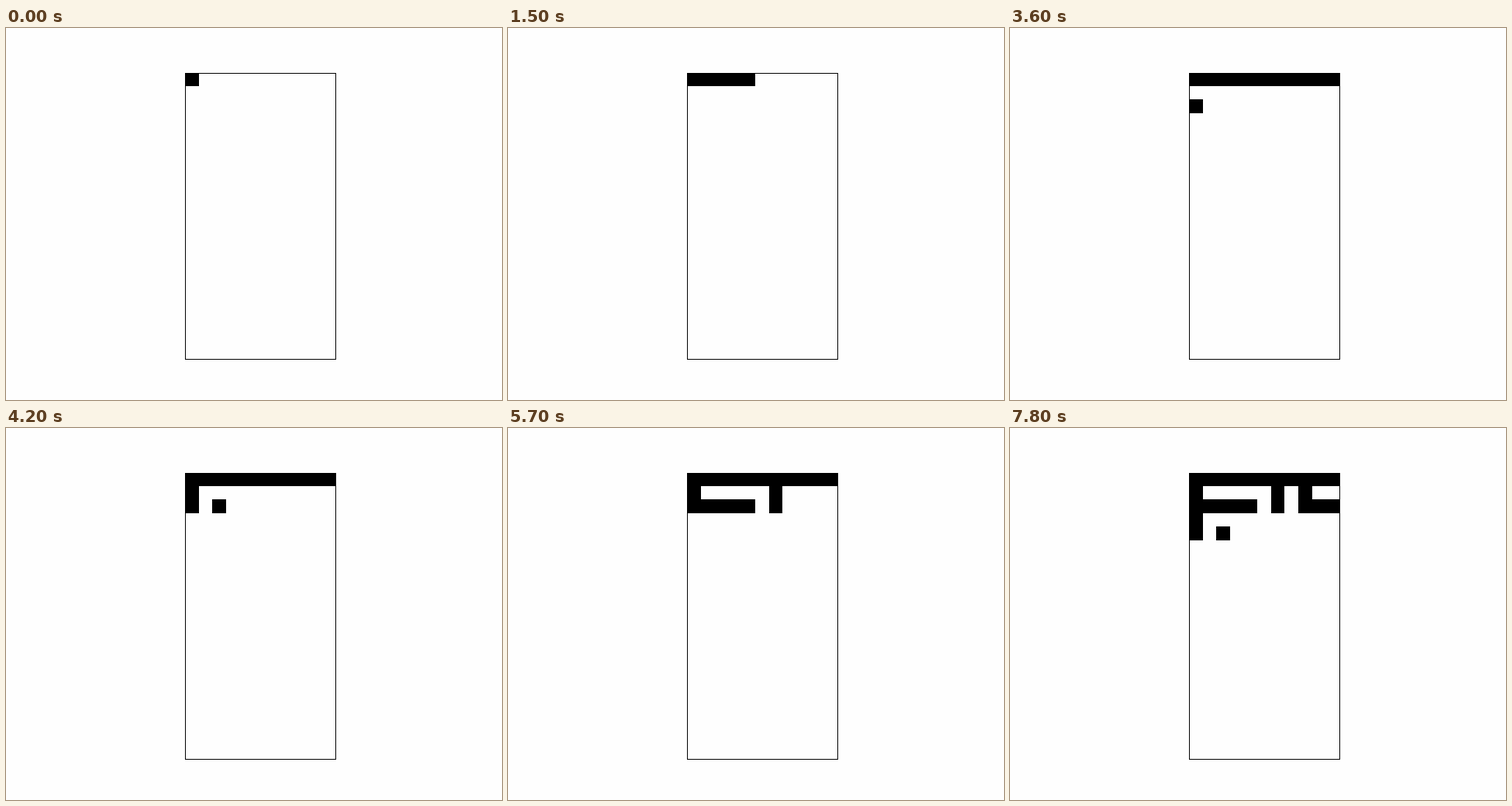
An HTML page with a canvas for the animation above (8000 ms loop, 640 by 480 pixels).

```html
<!DOCTYPE html>
<html lang="en">
<head>
<meta charset="utf-8">
<title>Maze growing</title>
<style>
  html, body { margin: 0; height: 100%; overflow: hidden; background: #fefefe; }
  canvas { display: block; }
</style>
</head>
<body>
<canvas id="stage" width="640" height="480"></canvas>
<script>
const ctx = document.getElementById("stage").getContext("2d");
const LOOP = 8000, STEP = 300, ROOMS = 6;
const linkedUp = [6, 9, 10, 12]; // rooms joined upward; the rest join left

const edgeX = c => Math.floor(231.4 + c * 194 / 11);
const edgeY = r => Math.max(58, Math.floor(57.4 + r * 370 / 21));

function fillCell(c, r) {
  const x = edgeX(c), y = edgeY(r);
  ctx.fillRect(x, y, edgeX(c + 1) - x, edgeY(r + 1) - y);
}

// Odd steps place a room, even steps open the passage to its neighbour.
function drawStep(i) {
  const room = Math.ceil(i / 2);
  const c = room % ROOMS * 2, r = Math.floor(room / ROOMS) * 2;
  if (i === 0 || i % 2) fillCell(c, r);
  else if (linkedUp.includes(room)) fillCell(c, r - 1);
  else fillCell(c - 1, r);
}

function draw(t) {
  ctx.fillStyle = "#fefefe";
  ctx.fillRect(0, 0, 640, 480);
  ctx.fillStyle = ctx.strokeStyle = "#000";
  ctx.strokeRect(231.5, 58.5, 194, 369);
  const last = Math.max(0, Math.floor(t / STEP) - 1);
  for (let i = 0; i <= last; i++) drawStep(i);
}

const start = performance.now();
function tick() {
  draw((performance.now() - start) % LOOP);
  requestAnimationFrame(tick);
}
tick();
</script>
</body>
</html>
```
